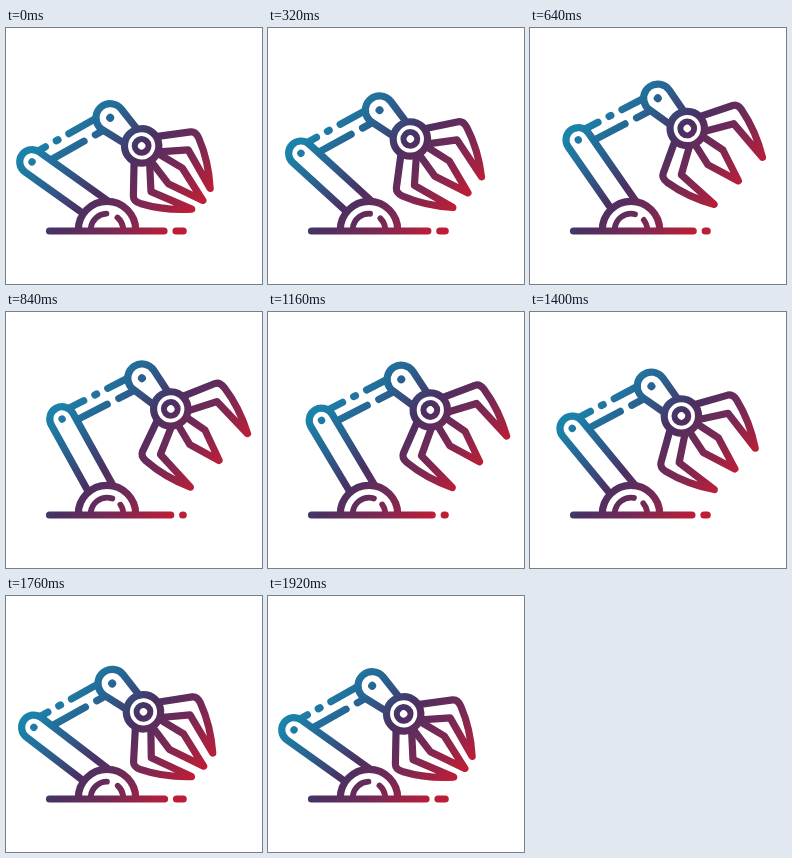
An HTML page with a canvas for the animation above (1960 ms loop, 256x256 px).

```html
<!DOCTYPE html>
<html>
<head>
<meta charset="utf-8">
<style>
html, body { margin: 0; width: 100%; height: 100%; overflow: hidden; background: #fff; }
canvas { display: block; width: 256px; height: 256px; }
</style>
</head>
<body>
<canvas></canvas>
<script>
const LOOP = 1960, STEP = 40, HALF = 960, RAD = Math.PI / 180;
const canvas = document.querySelector('canvas');
const c = canvas.getContext('2d');
const dpr = window.devicePixelRatio || 1;
canvas.width = canvas.height = 256 * dpr;

const tint = c.createLinearGradient(74, 74, 184, 184);
[[0, '#1b82aa'], [.23, '#286391'], [.48, '#4a3062'], [.75, '#7c2853'], [1, '#bd1e37']]
  .forEach(stop => tint.addColorStop(...stop));

const finger = new Path2D('M16 -9.5 L49 -14 Q54 -14.5 57 -8 Q67 15 68.5 42.5 L46.5 4 L17 6');
const midFinger = new Path2D('M16 -5 L45 -10.5 L82 0 L45 10.5 L16 5');

const mix = (a, b, k) => a + (b - a) * k;
const along = ([x, y], len, deg) => [x + len * Math.cos(deg * RAD), y + len * Math.sin(deg * RAD)];

function at([x, y], deg, draw) {
  c.save();
  c.translate(x, y);
  c.rotate(deg * RAD);
  draw();
  c.restore();
}

function line(x1, y1, x2, y2) {
  c.beginPath();
  c.moveTo(x1, y1);
  c.lineTo(x2, y2);
  c.stroke();
}

function arc(x, y, r, from, to) {
  c.beginPath();
  c.arc(x, y, r, from * RAD, to * RAD);
}

// Link with a rounded end around its joint, narrowing to half-width `end`
function link(r, end, len, dot) {
  const a = Math.acos((r - end) / len);
  c.beginPath();
  c.moveTo(len, -end);
  c.arc(0, 0, r, -a, a, true);
  c.lineTo(len, end);
  c.fill();
  c.stroke();
  c.fillStyle = '#000';
  arc(0, 0, dot, 0, 360);
  c.fill();
  c.fillStyle = '#fff';
}

// The dashes of the two rails slide in opposite directions
function forearm(k) {
  const slide = 9 * k;
  line(10, -6.5, 19 + slide, -6.5);
  line(31.5 + slide, -6.5, 33.5 + slide, -6.5);
  line(46 + slide, -6.5, 78, -6.5);
  line(10, 7.5, 55.5 - slide, 7.5);
  line(68.5 - slide, 7.5, 78, 7.5);
}

function claw(k) {
  c.save();
  c.scale(mix(1, .86, k), 1);
  c.stroke(midFinger);
  c.restore();
  for (const side of [1, -1]) {
    c.save();
    c.scale(1, side);
    c.rotate((-41.7 - 20 * k) * RAD);
    c.stroke(finger);
    c.restore();
  }
  arc(0, 0, 17.2, 0, 360);
  c.fill();
  c.stroke();
  c.lineWidth = 6.2;
  arc(0, 0, 6.8, 0, 360);
  c.stroke();
}

function base(k) {
  arc(101, 202, 28.7, 180, 360);
  c.fill();
  c.stroke();
  line(43.5, 203, mix(158, 165, k), 203);
  line(mix(170, 177, k), 203, 177.2, 203);
  c.lineWidth = 5.8;
  arc(101, 202, 16.3, 188, mix(268, 290, k));
  c.stroke();
  arc(101, 202, 16.3, mix(310, 326, k), 350);
  c.stroke();
}

function draw(k) {
  c.setTransform(dpr, 0, 0, dpr, 0, 0);
  c.globalCompositeOperation = 'source-over';
  c.fillStyle = '#fff';
  c.fillRect(0, 0, 256, 256);
  c.strokeStyle = '#000';
  c.lineWidth = 7.2;
  c.lineCap = c.lineJoin = 'round';

  const armTurn = mix(35.5, 62.1, k), foreTurn = mix(-29.4, -27, k), clawTurn = mix(41.7, 47.1, k);
  const elbow = along([100.5, 187], -91.5, armTurn);
  const shoulder = along(elbow, 89.7, foreTurn);
  const hub = along(shoulder, 42.2, clawTurn);

  at(elbow, foreTurn, () => forearm(k));
  at(elbow, armTurn, () => link(12.3, 12.3, 90, 3.7));
  at(shoulder, clawTurn, () => link(14.2, 9.5, 28, 4));
  at(hub, clawTurn, () => claw(k));
  base(k);

  // Screen turns the black line art into the gradient and leaves white alone
  c.globalCompositeOperation = 'screen';
  c.fillStyle = tint;
  c.fillRect(0, 0, 256, 256);
}

const start = performance.now();
function tick() {
  const t = Math.floor((performance.now() - start) % LOOP / STEP) * STEP;
  const u = 1 - Math.abs(t - HALF) / HALF;
  draw(u * u * (3 - 2 * u));
  requestAnimationFrame(tick);
}
tick();
</script>
</body>
</html>
```
